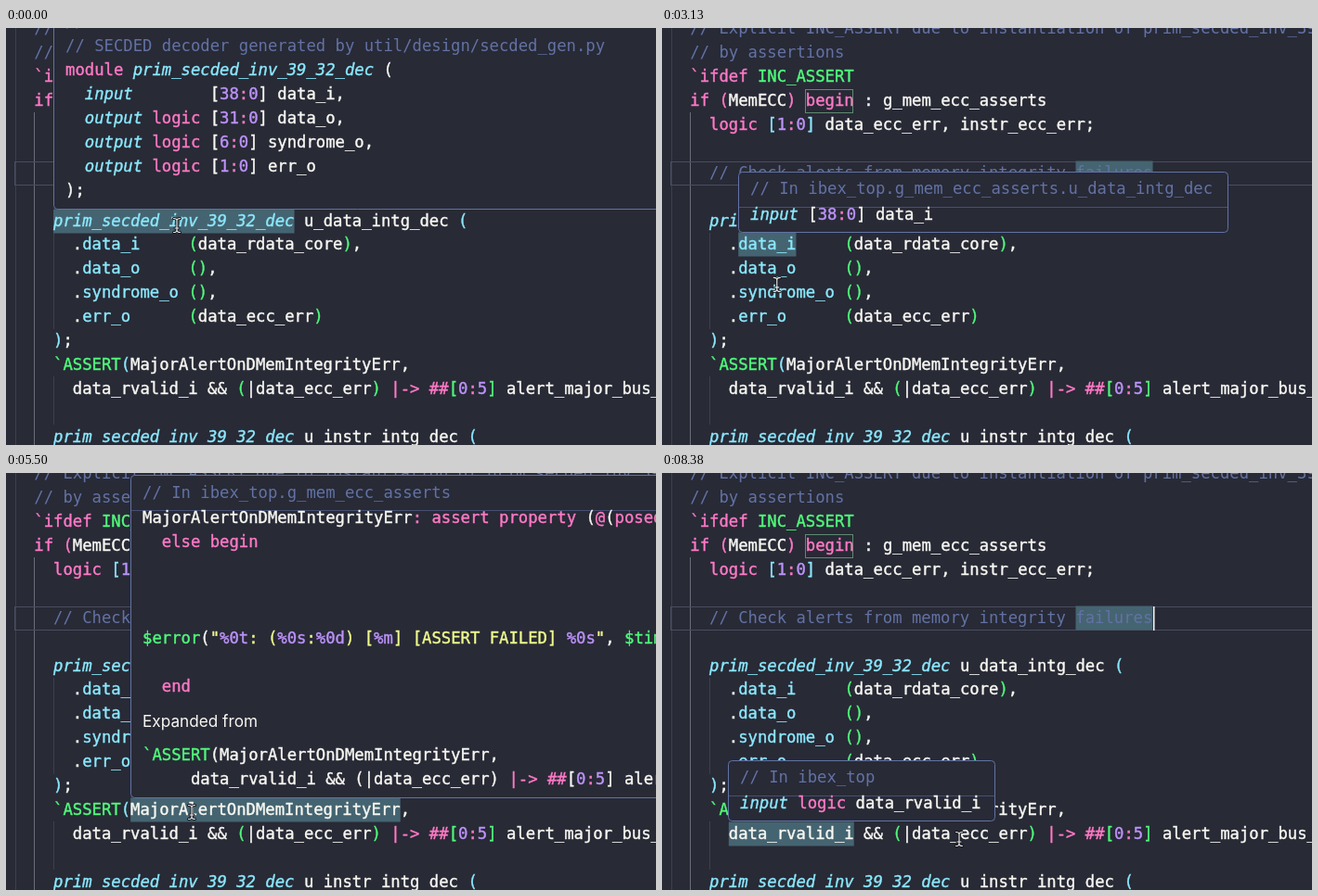
Animation of 700 by 450 pixels, one loop 8.44 s. Source, as an HTML page with a canvas:

```html
<!DOCTYPE html>
<html lang="en">
<head>
<meta charset="utf-8">
<title>Hover hints in a code editor</title>
<style>
  html, body { margin: 0; width: 100%; height: 100%; overflow: hidden; background: #282a36; }
  canvas { display: block; }
</style>
</head>
<body>
<canvas id="stage" width="700" height="450"></canvas>
<script>
const ctx = document.getElementById('stage').getContext('2d');
const LOOP = 8440, CHAR = 10.38, ROW = 25.93;
const BG = '#282a36', MARK = '#456471', BORDER = '#6272a4';
const MONO = '17.24px "DejaVu Sans Mono", monospace';
const SANS = '17.2px Inter, sans-serif';

// Each token starts with "~" and a colour letter; "i" is italic, "s" is sans.
const COLORS = {
  w: '#f8f8f2', p: '#ff79c6', c: '#8be9fd', i: '#8be9fd', g: '#50fa7b',
  v: '#bd93f9', y: '#f1fa8c', m: '#6272a4', s: '#f8f8f2'
};

const colX = col => 30.3 + col * CHAR;
const rowY = row => Math.round(0.1 + row * ROW);
const range = (hi, bracket) => `~${bracket}[~v${hi}~p:~v0~${bracket}]`;
const port = (name, gap, signal) =>
  `~w.~c${name}${' '.repeat(gap)}~g(~w${signal}~g)`;
const instance = name => `~iprim_secded_inv_39_32_dec~w ${name} ~c(`;

// [row, column, text]
const code = [
  [0, 0, '~m// Explicit INC_ASSERT due to instantiation of prim_secded_inv_39_32_dec'],
  [1, 0, '~m// by assertions'],
  [2, 0, '~p`ifdef ~gINC_ASSERT'],
  [3, 0, '~pif (~wMemECC~p) begin~w : g_mem_ecc_asserts'],
  [4, 2, `~plogic ${range(1, 'c')}~w data_ecc_err, instr_ecc_err;`],
  [6, 2, '~m// Check alerts from memory integrity failures'],
  [8, 2, instance('u_data_intg_dec')],
  [9, 4, port('data_i', 5, 'data_rdata_core') + '~w,'],
  [10, 4, port('data_o', 5, '') + '~w,'],
  [11, 4, port('syndrome_o', 1, '') + '~w,'],
  [12, 4, port('err_o', 6, 'data_ecc_err')],
  [13, 2, '~c)~w;'],
  [14, 2, '~g`ASSERT~c(~wMajorAlertOnDMemIntegrityErr,'],
  [15, 4, '~wdata_rvalid_i && ~g(~w|data_ecc_err~g) ~p|-> ##~g[~v0~p:~v5~g]~w alert_major_bus_o'],
  [17, 2, instance('u_instr_intg_dec')]
];

const portLine = (dir, type, hi, name) =>
  `~w  ~i${dir} ~p${type} ${range(hi, 'w')}~w ${name}`;

// Hover box above a word: lines are [height above the bottom edge, text].
const hint = (from, to, bottom, row, col, length, width, height, lines, rule) =>
  ({ from, to, bottom, row, col, length, width, height, lines, rule });
const shortHint = (from, to, bottom, row, col, length, width, head, body) =>
  hint(from, to, bottom, row, col, length, width, 65, [[47, '~m// In ' + head], [19, body]], 27);

const hints = [
  hint(0, 1190, 195, 8, 2, 25, 700, 300, [
    '~m//',
    '~m// SECDED decoder generated by util/design/secded_gen.py',
    '~pmodule ~iprim_secded_inv_39_32_dec~w (',
    portLine('input', '      ', 38, 'data_i,'),
    portLine('output', 'logic', 31, 'data_o,'),
    portLine('output', 'logic', 6, 'syndrome_o,'),
    portLine('output', 'logic', 1, 'err_o'),
    '~w);'
  ].map((text, n) => [20 + (7 - n) * 26, text])),
  shortHint(1190, 2250, 220, 9, 17, 15, 453, 'ibex_top',
    '~plogic ~w[MemDataWidth~p-~v1~p:~v0~w] data_rdata_core;'),
  shortHint(2560, 3440, 220, 9, 5, 6, 527, 'ibex_top.g_mem_ecc_asserts.u_data_intg_dec',
    `~iinput ${range(38, 'w')}~w data_i`),
  shortHint(3500, 4250, 272, 11, 5, 10, 527, 'ibex_top.g_mem_ecc_asserts.u_data_intg_dec',
    `~ioutput ~plogic ${range(6, 'w')}~w syndrome_o`),
  hint(5500, 7440, 350, 14, 10, 28, 700, 348, [
    [329, '~m// In ibex_top.g_mem_ecc_asserts'],
    [302, '~wMajorAlertOnDMemIntegrityErr~p: assert property ~w(~p@~w(~pposedge ~wclk_i)'],
    [276, '~p  else begin'],
    [172, '~g$error~w(~y"~v%0t~y: (~v%0s~y:~v%0d~y) [~v%m~y] [ASSERT FAILED] ~v%0s~y"~w, ~g$time~w,'],
    [120, '~p  end'],
    [82, '~sExpanded from'],
    [46, '~g`ASSERT~w(MajorAlertOnDMemIntegrityErr,'],
    [20, '~w     data_rvalid_i && (|data_ecc_err) ~p|-> ##~w[~v0~p:~v5~w] alert_major_bus_o']
  ], 310),
  shortHint(7440, LOOP, 375, 15, 4, 13, 287, 'ibex_top', '~iinput ~plogic~w data_rvalid_i')
];

// Pointer stops: [time, x, y]
const stops = [
  [0, 184, 213], [880, 350, 230], [1000, 339, 231], [1190, 339, 231],
  [2380, 116, 238], [2560, 116, 238], [3380, 126, 288], [3500, 126, 288],
  [3940, 96, 338], [4310, 112, 352], [5190, 200, 366], [6060, 200, 366],
  [6310, 206, 367], [6810, 206, 367], [7190, 181, 390], [7440, 181, 390],
  [8250, 319, 394], [8380, 320, 395], [LOOP, 320, 395]
];

// A hairline stroke gives the text its slightly heavy weight.
function drawText(x, y, text) {
  let col = 0;
  ctx.lineWidth = 0.4;
  for (const token of text.split('~').slice(1)) {
    const kind = token[0], body = token.slice(1);
    ctx.font = kind === 's' ? SANS : (kind === 'i' ? 'italic ' : '') + MONO;
    ctx.fillStyle = ctx.strokeStyle = COLORS[kind];
    ctx.fillText(body, x + col * CHAR, y + 6);
    if (kind !== 'm' && kind !== 's') ctx.strokeText(body, x + col * CHAR, y + 6);
    col += body.length;
  }
}

function fill(color, x, y, w, h) {
  ctx.fillStyle = color;
  ctx.fillRect(x, y, w, h);
}

function outline(color, x, y, w, h) {
  ctx.strokeStyle = color;
  ctx.lineWidth = 1;
  ctx.strokeRect(x + 0.5, y + 0.5, w, h);
}

function markWord(row, col, length) {
  fill(MARK, colX(col), rowY(row) - 12.5, length * CHAR, 26);
}

function drawEditor(t, active) {
  fill(BG, 0, 0, 700, 450);
  fill('#3d404e', 10, 0, 1, 450);
  fill('#3d404e', 51, 221, 1, 104);
  fill('#3d404e', 51, 376, 1, 52);
  fill('#6b6d7a', 30, 91, 1, 359);
  outline('#4a4d60', 9, 144, 720, 25);
  markWord(6, 40, 8);
  if (active) markWord(active.row, active.col, active.length);
  outline('#5f8a70', 154, 66, 51, 25);
  for (const [row, col, text] of code) drawText(colX(col), rowY(row), text);
  if ((t + 750) % 1000 < 500) fill('#f8f8f2', 529, 144, 1.5, 26);
}

function drawHint({ bottom, col, width, height, lines, rule }) {
  const x = Math.floor(colX(col));
  ctx.beginPath();
  ctx.roundRect(x + 0.5, bottom - height + 0.5, width, height, 4);
  ctx.fillStyle = BG;
  ctx.fill();
  ctx.strokeStyle = BORDER;
  ctx.lineWidth = 1;
  ctx.stroke();
  if (rule) fill('#465073', x + 1, bottom - rule, width - 1, 1);
  for (const [up, text] of lines) drawText(x + 13, bottom - up, text);
}

function drawPointer(t) {
  const next = Math.max(1, stops.findIndex(stop => stop[0] > t));
  const [t0, x0, y0] = stops[next - 1], [t1, x1, y1] = stops[next];
  const k = (t - t0) / (t1 - t0), ease = k * k * (3 - 2 * k);
  ctx.save();
  ctx.translate(x0 + (x1 - x0) * ease, y0 + (y1 - y0) * ease);
  const beam = new Path2D('M-3.5-7.5Q0-7.5 0-5Q0-7.5 3.5-7.5M0-5V5M-3.5 7.5Q0 7.5 0 5Q0 7.5 3.5 7.5M-2 3H2');
  ctx.lineCap = 'round';
  for (const [color, width] of [['#15161c', 3], ['#e8e8e8', 1.2]]) {
    ctx.strokeStyle = color;
    ctx.lineWidth = width;
    ctx.stroke(beam);
  }
  ctx.restore();
}

function frame() {
  const t = performance.now() % LOOP;
  const active = hints.find(h => t >= h.from && t < h.to);
  drawEditor(t, active);
  if (active) drawHint(active);
  drawPointer(t);
  requestAnimationFrame(frame);
}
frame();
</script>
</body>
</html>
```
